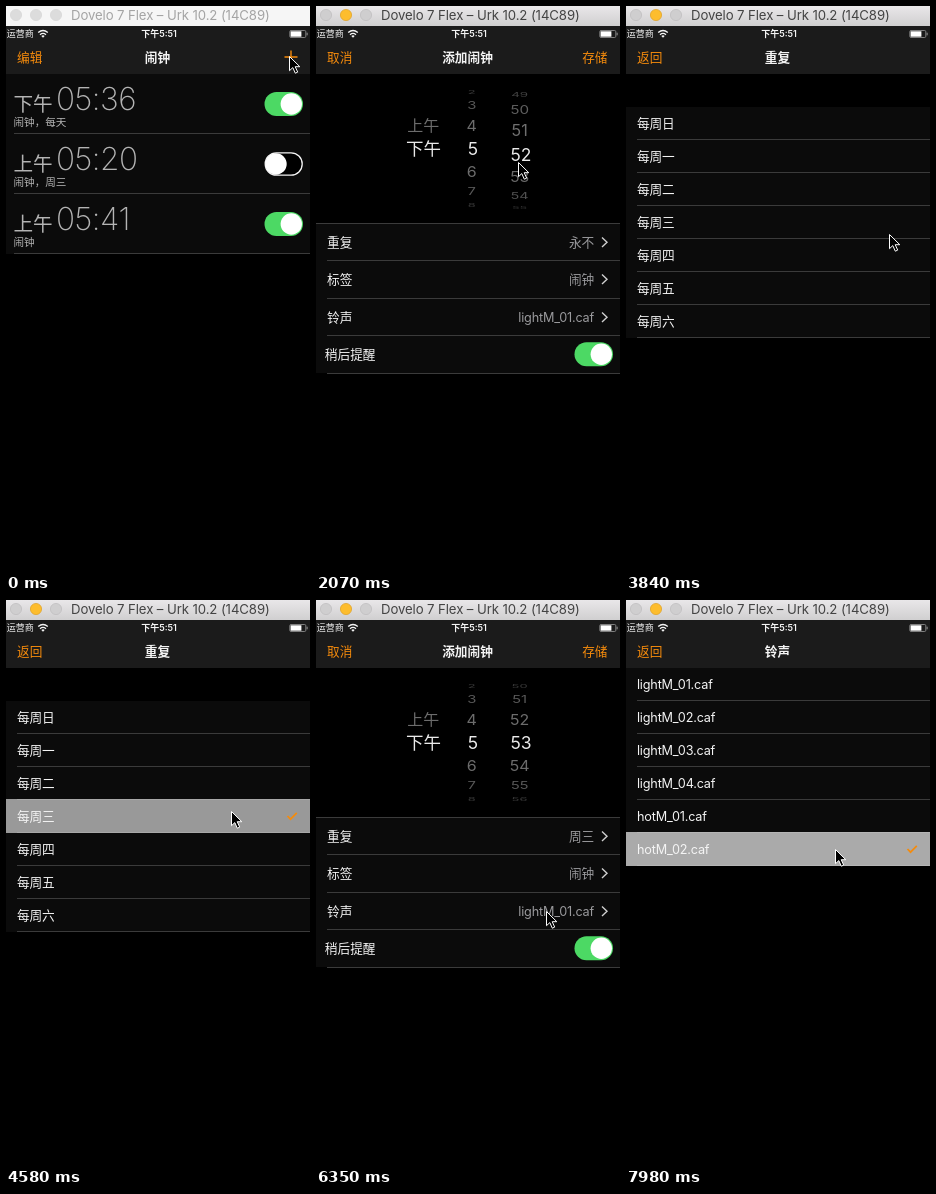
Write an HTML page that moves like this. It is 304 px wide and 566 px high and loops after 8000 ms.

```html
<!DOCTYPE html>
<html lang="zh-CN">
<head>
<meta charset="utf-8">
<title>闹钟</title>
<style>
html, body { margin: 0; width: 100%; height: 100%; overflow: hidden; background: #000; }
svg { display: block; width: 304px; height: 566px; }
text { font: 12.7px Inter, "Noto Sans CJK SC", "Noto Sans CJK", sans-serif; fill: #f4f4f4; white-space: pre; }
.window { font-size: 13.2px; letter-spacing: -.1px; }
.status { font-size: 9px; }
.bold { font-weight: 600; }
.orange { fill: #f58b0c; }
.value { fill: #9a9a9d; }
.file { letter-spacing: -.2px; }
.period { font-size: 19.6px; fill: #b4b4b4; }
.clock { font-size: 31.5px; font-weight: 200; letter-spacing: -.5px; fill: #b4b4b4; }
.note { font-size: 10.6px; fill: #b4b4b4; }
.sep { stroke: #3b3b3b; }
.cell { fill: #0b0b0b; }
</style>
</head>
<body>
<svg id="stage" viewBox="0 0 304 566"></svg>
<script>
const stage = document.getElementById('stage');
const LOOP = 8000, STEP = 147.8;
const DAYS = [...'日一二三四五六'].map(d => '每周' + d);
const TONES = ['lightM_01', 'lightM_02', 'lightM_03', 'lightM_04', 'hotM_01', 'hotM_02'].map(n => n + '.caf');

// Keys are [step, ...values]; linear in between.
function track(k, keys) {
  const i = keys.findIndex(key => key[0] >= k);
  if (i === 0) return keys[0].slice(1);
  if (i < 0) return keys[keys.length - 1].slice(1);
  const a = keys[i - 1], b = keys[i], p = (k - a[0]) / (b[0] - a[0]);
  return a.slice(1).map((v, j) => v + (b[j + 1] - v) * p);
}

// Critically damped spring: 0 at `start`, settling on 1.
function settle(k, start) {
  const x = Math.max(0, k - start) * STEP / 1000 * 16.7;
  return 1 - (1 + x) * Math.exp(-x);
}

const CURSOR = [[8, 283, 50], [12, 202, 172], [13, 202, 168], [16, 202, 132], [18, 202, 126],
  [19, 202, 126], [21, 263, 228], [27, 263, 228], [29, 225, 211], [32, 225, 211], [35, 36, 50],
  [40, 36, 50], [43, 230, 311], [49, 230, 311], [52, 209, 249]];
const MINUTE = [[12, 51], [13, 51.25], [16, 52.75], [18, 53]];

const text = (x, y, s, cls = '', attrs = '') => `<text x="${x}" y="${y}" class="${cls}" ${attrs}>${s}</text>`;
const rect = (x, y, w, h, attrs) => `<rect x="${x}" y="${y}" width="${w}" height="${h}" ${attrs}/>`;
const line = (x, y) => `<path d="M${x} ${y}H304" class="sep"/>`;
const group = (x, y, body, opacity = 1) => `<g transform="translate(${x} ${y})" opacity="${opacity}">${body}</g>`;
const middle = 'text-anchor="middle"', end = 'text-anchor="end"';
const glow = (y, h, a) => a ? rect(0, y, 304, h, `fill="#d9d9d9" opacity="${a}"`) : '';

function toggle(y, on) {
  const body = on ? rect(258.5, y - 12, 38.5, 24, 'rx="12" fill="#4cd964"')
    : rect(259.2, y - 11.2, 37, 22.4, 'rx="11.2" fill="#000" stroke="#f4f4f4" stroke-width="1.3"');
  return body + `<circle cx="${on ? 285.3 : 270}" cy="${y}" r="10.7" fill="#fff"/>`;
}

function listPage() {
  const alarms = [['下午', '05:36', '闹钟，每天', true], ['上午', '05:20', '闹钟，周三', false], ['上午', '05:41', '闹钟', true]];
  return rect(0, 68, 304, 180, 'class="cell"') + alarms.map(([period, clock, note, on], i) => {
    const y = 68 + i * 60;
    return text(7.5, y + 36.5, period, 'period') + text(50, y + 36.2, clock, 'clock') +
      text(7.5, y + 52, note, 'note') + toggle(y + 30, on) + line(8, y + 59.5);
  }).join('');
}

function wheelItem(x, n, label) {
  const angle = n * 0.384, c = Math.cos(angle);
  if (c < 0.2) return '';
  const near = Math.abs(n) < 0.5;
  const scale = near ? 1 : 0.6 + 0.34 * c;
  const look = near ? 0.96 : 0.47 * c ** 0.8;
  return `<g transform="translate(${near ? x : x - 1.3} ${142.5 + 62 * Math.sin(angle)}) scale(${scale} ${scale * c})" opacity="${look}">` +
    text(0, 6.2, label, '', `${middle} style="font-size:17.5px"`) + '</g>';
}

function wheel(x, value) {
  const base = Math.round(value);
  let out = '';
  for (let v = base - 4; v <= base + 4; v++) out += wheelItem(x, v - value, v);
  return out;
}

function addPage(k) {
  const rows = [['重复', k < 38 ? '永不' : '周三'], ['标签', '闹钟'], ['铃声', 'lightM_01.caf']];
  const pressed = k === 22 ? 0 : k === 45 ? 2 : -1;
  const rowTop = i => Math.floor(217 + i * 37.5) + 0.5;
  const rowViews = rows.map(([label, value], i) => {
    const y = rowTop(i);
    return (i === pressed ? glow(y, 37.5, 0.8) : '') + text(11, y + 23.2, label) +
      text(278, y + 23.2, value, 'value file', end) +
      `<path d="M286 ${y + 14}l5 4.7l-5 4.7" fill="none" stroke="#d0d0d0" stroke-width="1.4"/>` + line(11, rowTop(i + 1));
  }).join('');
  return rect(0, 68, 304, 498, 'fill="#000"') + rect(0, 217, 304, 150, 'class="cell"') +
    wheelItem(108.5, -1, '上午') + wheelItem(107.5, 0, '下午') +
    wheel(157, 5) + wheel(205, track(k, MINUTE)[0]) +
    line(0, rowTop(0)) + rowViews + text(8.8, 353, '稍后提醒') + toggle(348.3, true) + line(11, rowTop(4));
}

function choicePage(top, items, checked, active, level) {
  return rect(0, 68, 304, 498, 'fill="#000"') + rect(0, top, 304, items.length * 33, 'class="cell"') +
    items.map((label, i) => {
      const y = top + i * 33;
      return line(11, y + 32.5) + (i === active ? glow(y - 1, 34, level) : '') +
        text(11, y + 21, label, 'file') +
        (i === checked ? `<path d="M281.5 ${y + 16}l3 3.2l6.3-6.4" fill="none" stroke="#f58b0c" stroke-width="1.7"/>` : '');
    }).join('');
}

function detailPage(k) {
  if (k < 44) {
    const level = { 30: 1, 31: 0.69, 32: 0.25 }[k] || 0;
    return choicePage(101, DAYS, k >= 31 ? 3 : -1, 3, level);
  }
  return choicePage(68, TONES, k >= 54 ? 5 : 0, 5, { 53: 1, 54: 0.777 }[k] || 0);
}

const navBar = rect(0, 20, 304, 48, 'fill="#1b1b1b"');
const navTitle = s => text(151.5, 56, s, 'bold', middle);

function modal(k) {
  const push = k < 44 ? settle(k, 22.4) - settle(k, 37.4) : settle(k, 45.4);
  const p = push > 0.995 ? 1 : push < 0.005 ? 0 : push;
  const backAlpha = k === 36 || k === 37 ? 0.25 : 1;
  let out = '';
  if (p < 1) out += group(-91 * p, 0, addPage(k));
  if (p > 0) out += group(304 * (1 - p), 0, detailPage(k));
  out += navBar;
  out += group(0, 0, text(11, 56, '取消', 'orange') + text(291.5, 56, '存储', 'orange', end), 1 - p);
  out += group(-115 * p, 0, navTitle('添加闹钟'), 1 - p);
  out += group(0, 0, text(11, 56, '返回', 'orange'), p * backAlpha);
  out += group(150 * (1 - p), 0, navTitle(k < 44 ? '重复' : '铃声'), p);
  return out;
}

function windowBar(active) {
  const ring = active ? '#bdbcbd' : '#d6d6d6', fill = active ? '#cfcecf' : '#dcdcdc';
  const dots = [10, 30, 50].map((x, i) => {
    const lit = active && i === 1;
    return `<circle cx="${x}" cy="9" r="5.6" fill="${lit ? '#fdbd2e' : fill}" stroke="${lit ? '#dfa023' : ring}" stroke-width=".7"/>`;
  }).join('');
  return rect(0, 0, 304, 20, `fill="${active ? 'url(#bar)' : '#f6f6f6'}"`) + dots +
    text(65, 13.8, 'Dovelo 7 Flex – Urk 10.2 (14C89)', 'window', `style="fill:${active ? '#434343' : '#a4a4a4'}"`);
}

const statusBar = text(0.8, 31, '运营商', 'status') + text(153, 31, '下午5:51', 'status bold', middle) +
  '<g fill="none" stroke="#f4f4f4" stroke-width="1.3"><path d="M32.2 26.6q4.8-4.2 9.6 0M34 28.7q3-2.6 6 0"/></g>' +
  '<path d="M35.3 30q1.7-1.3 3.4 0l-1.7 1.7z" fill="#f4f4f4"/>' +
  rect(283.8, 24.5, 16, 7, 'rx="1.2" fill="none" stroke="#999" stroke-width=".8"') +
  rect(284.6, 25.3, 10.8, 5.4, 'fill="#fff"') + rect(300.6, 26.7, 1, 2.6, 'fill="#999"');

const arrow = '<path d="M.5.5v14.2l3.3-3.1l2.5 5.6l2.4-1.1l-2.5-5.4h4.6z" fill="#000" stroke="#fff"/>';
const defs = '<defs><linearGradient id="bar" x2="0" y2="1"><stop stop-color="#e9e7e9"/><stop offset="1" stop-color="#d0cfd0"/></linearGradient></defs>';

function render(k) {
  let out = defs + rect(0, 0, 304, 566, 'fill="#000"');
  if (k < 9) {
    out += listPage() + navBar + text(11, 56, '编辑', 'orange') + navTitle('闹钟') +
      `<path d="M278.5 51h13M285 44.5v13" stroke="#f58b0c" stroke-width="1.4" opacity="${k === 3 || k === 4 ? 0.25 : 1}"/>`;
  }
  if (k >= 5) {
    const rise = k < 9 ? Math.round(546 * (1 - settle(k, 4.75))) : 0;
    out += group(0, rise, rect(0, 20, 304, 546, 'fill="#000"') + modal(k));
  }
  out += rect(0, 20, 304, 14, 'fill="#1b1b1b"');
  out += statusBar + windowBar(k >= 2) + group(...track(k, CURSOR), arrow);
  stage.innerHTML = out;
}

let shown = -1;
function tick() {
  const k = Math.floor((performance.now() % LOOP + 6) / STEP);
  if (k !== shown) render(shown = k);
  requestAnimationFrame(tick);
}
tick();
</script>
</body>
</html>
```
